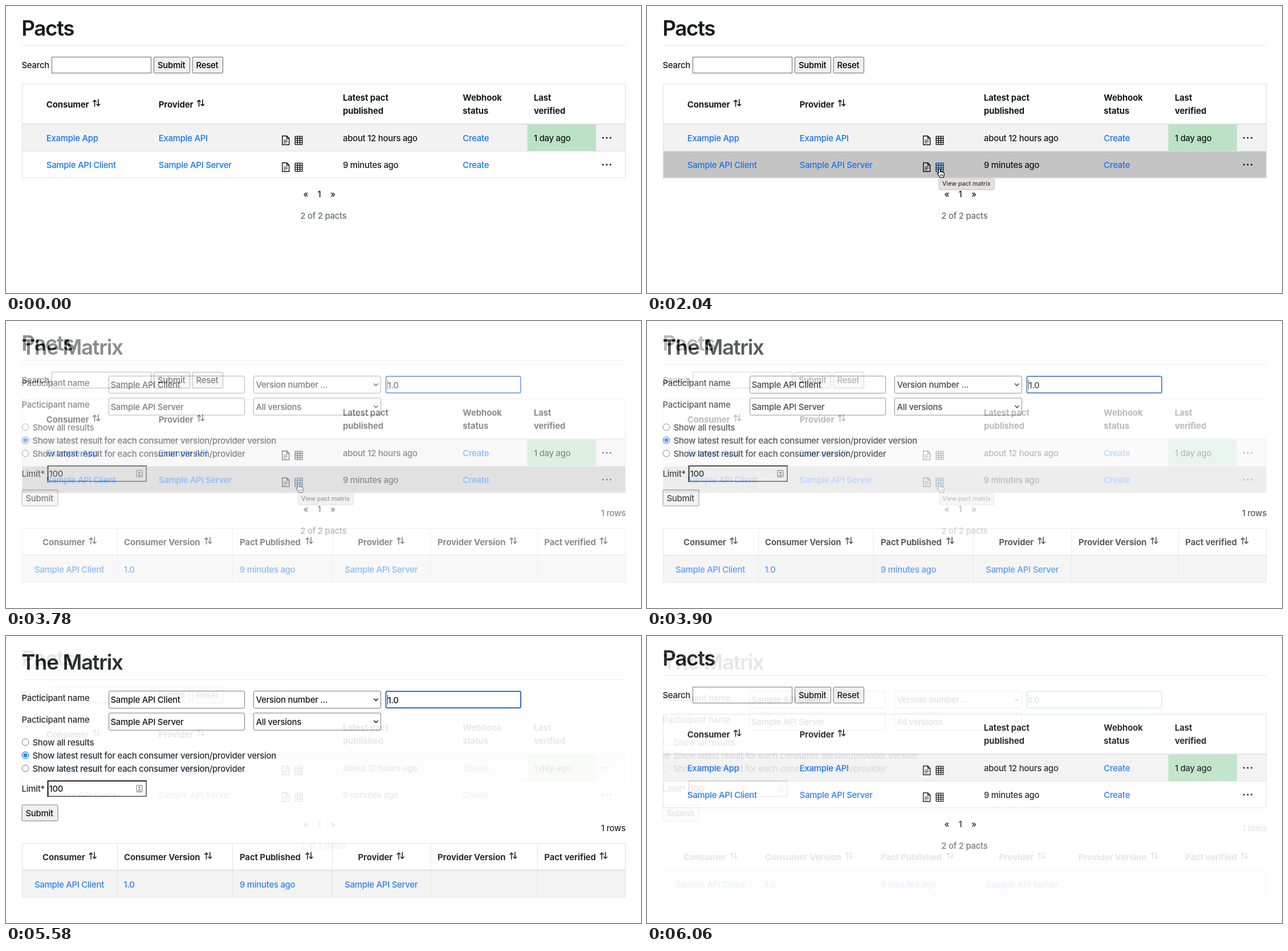
Write an HTML page that moves like this. It is 1114 by 503 pixels and loops after 6.12 s.

```html
<!DOCTYPE html>
<html lang="en">
<head>
<meta charset="utf-8">
<title>Pacts</title>
<style>
html, body { margin: 0; height: 100%; overflow: hidden; background: #fff; }
svg { display: block; width: 100vw; height: 100vh; }
text {
  font: 450 14.9px Inter, "Open Sans", sans-serif;
  font-optical-sizing: none;
  letter-spacing: -.25px;
  fill: #17191c;
  white-space: pre;
}
.bold { font-weight: 700; letter-spacing: -.1px; }
.title { font-size: 36.7px; font-weight: 600; letter-spacing: -1.35px; }
.link { fill: #1a73f5; }
.muted { fill: #6c7075; }
.form { fill: #000; }
.tip { font-size: 10.6px; letter-spacing: 0; fill: #333; }
.end { text-anchor: end; }
.mid { text-anchor: middle; }
</style>
</head>
<body>
<svg id="stage" viewBox="0 0 1114 503"></svg>
<script>
const LINE = '#dee0e3', EDGE = '#6b6b6b', INK = '#111', BLUE = '#1a73f5';

// y is the middle of the capitals
const text = (x, y, str, cls = '') => `<text x="${x}" y="${y + 5.5}" class="${cls}">${str}</text>`;
const title = (y, str) => `<text x="27.2" y="${y}" class="title">${str}</text>`;
const rect = (x, y, w, h, fill, extra = '') =>
  `<rect x="${x}" y="${y}" width="${w}" height="${h}" fill="${fill}" ${extra}/>`;
const path = (d, stroke = INK, width = 1.4, fill = 'none') =>
  `<path d="${d}" stroke="${stroke}" stroke-width="${width}" fill="${fill}" stroke-linecap="round" stroke-linejoin="round"/>`;
const frame = (x, y, w, h, fill = '#fff', stroke = EDGE, r = 0, lw = 1) =>
  rect(x + lw / 2, y + lw / 2, w - lw, h - lw, fill, `stroke="${stroke}" stroke-width="${lw}" rx="${r}"`);
const at = (x, y, body) => `<g transform="translate(${x} ${y})">${body}</g>`;

const sort = (x, y) => at(x, y, path('M3.5 12V1M.7 3.8L3.5 1l2.8 2.8M9.8 0v11M7 8.2l2.8 2.8 2.8-2.8', INK, 1.6));
const heading = (x, y, str, iconX) => text(x, y, str, 'bold') + sort(iconX, y - 8);
const button = (x, y, w, str) => frame(x, y, w, 29, '#efefef', EDGE, 1.5) + text(x + 7, y + 14.5, str, 'form');
const doc = (x, y) => at(x, y,
  path('M.7.7h8l4 4v11.6H.7zM8.5.9V5h4') + path('M3.4 8h6.4M3.4 10.5h6.4M3.4 13h4', INK, 1.1));
const grid = (x, y, color) => at(x, y,
  path('M.7.7h12.6v14.4H.7zM4.9.7v14.4M9.1.7v14.4M.7 4.3h12.6M.7 7.9h12.6M.7 11.5h12.6', color, 1.3));
const dots = y => [1047.3, 1053.9, 1060.5].map(x => `<circle cx="${x}" cy="${y}" r="1.5" fill="${INK}"/>`).join('');
const select = (y, str) => frame(434, y, 224, 31, '#fff', EDGE, 2) + text(438.5, y + 15.5, str, 'form') +
  path(`M645.8 ${y + 14}l3.2 3.4 3.2-3.4`, INK, 1.7);
const field = (y, str) => frame(180, y, 239, 31, '#fff', EDGE, 2) + text(183.5, y + 15.5, str, 'form');
const radio = (y, str, on) =>
  `<circle cx="34" cy="${y}" r="5.8" fill="#fff" stroke="${on ? BLUE : EDGE}" stroke-width="${on ? 1.3 : 1}"/>` +
  (on ? `<circle cx="34" cy="${y}" r="3.6" fill="${BLUE}"/>` : '') + text(46.5, y, str);

const row = (y, consumer, provider, published) =>
  text(70.8, y, consumer, 'link') + text(267.8, y, provider, 'link') +
  doc(484, y - 4.5) + grid(506.5, y - 3.8, INK) +
  text(591, y, published) + text(801.3, y, 'Create', 'link') + dots(y - .5);

const pacts =
  title(51.5, 'Pacts') + rect(28, 69, 1059, 1, '#e6e6e6') +
  text(27.5, 103.5, 'Search') + frame(80, 89, 175, 29) +
  button(259, 89, 64, 'Submit') + button(326.5, 89, 54.5, 'Reset') +
  rect(28, 208, 1059, 46, '#f2f2f2') + rect(914.5, 208, 120.5, 46, '#bbe2c5') +
  `<g class="hover">${rect(28, 254.5, 1059, 47, '#c4c4c4')}</g>` +
  frame(28, 136.5, 1059, 165, 'none', LINE) +
  rect(28, 206, 1059, 2, LINE) + rect(28, 254, 1059, 1, LINE) +
  heading(70.8, 172, 'Consumer', 152) + heading(267.8, 172, 'Provider', 335) +
  text(591, 160.5, 'Latest pact', 'bold') + text(591, 183.5, 'published', 'bold') +
  text(801.3, 160.5, 'Webhook', 'bold') + text(801.3, 183.5, 'status', 'bold') +
  text(926, 160.5, 'Last', 'bold') + text(926, 183.5, 'verified', 'bold') +
  row(231.5, 'Example App', 'Example API', 'about 12 hours ago') +
  text(926, 231.5, '1 day ago') +
  row(278.5, 'Sample API Client', 'Sample API Server', '9 minutes ago') +
  text(526, 329, '«', 'mid') + text(549.5, 329, '1', 'mid') + text(573.5, 329, '»', 'mid') +
  text(516.3, 367, '2 of 2 pacts', 'muted');

const hand = at(508.5, 284.5,
  path('M3.2 2c0-2 2.8-2 2.8 0v4.5c.6-1.2 2.4-1 2.6.3.7-.9 2.2-.5 2.3.7.9-.6 2 0 2 1.2v2.6c0 1.8-1.1 2.3-1.2 4.7H5.3C5 14 2.6 12 1 9.8c-.9-1.4.7-2.4 2.2-.8z', '#000', 1.1, '#fff') +
  path('M6.3 10.5v3M8.4 10.5v3M10.4 10.5v3', '#000', .8));
const hover =
  grid(506.5, 274.7, '#1c5a9c') +
  rect(511.5, 302, 99, 21.5, '#000', 'rx="4" opacity=".1"') +
  frame(511.5, 301, 98, 21, '#e5e0e0', '#cfcaca', 3.5) +
  `<text x="518" y="315.2" class="tip">View pact matrix</text>` + hand;

const matrix =
  rect(0, 0, 1114, 503, '#fff') +
  title(59, 'The Matrix') + rect(28, 76, 1059, 1, '#e6e6e6') +
  text(27.5, 108.5, 'Pacticipant name') + field(96, 'Sample API Client') + select(96, 'Version number ...') +
  frame(665.5, 96, 238.5, 31, '#fff', '#1f5bc4', 2.5, 2) + rect(669, 103, 1, 17, INK) + text(669.5, 112, '1.0', 'form') +
  text(27.5, 146.5, 'Pacticipant name') + field(134.5, 'Sample API Server') + select(134.5, 'All versions') +
  radio(186, 'Show all results') +
  radio(209, 'Show latest result for each consumer version/provider version', true) +
  radio(232, 'Show latest result for each consumer version/provider') +
  text(27.5, 267.5, 'Limit*') + frame(72.5, 253, 174.5, 29, '#fff', EDGE, 0, 2) +
  path('M73.5 281V254H246', '#111', 2) + text(75.5, 267.5, '100', 'form') +
  frame(228.5, 261, 11, 13, '#fff', '#777', 1.5, 1.2) +
  `<circle cx="234" cy="265.5" r="1.6" fill="#666"/>` + path('M231.6 269.3h4.8M231.6 271.3h4.8', '#666', 1) +
  button(27.5, 295.5, 64, 'Submit') + text(1087, 336.5, '1 rows', 'end') +
  rect(28, 411, 1059, 47, '#f2f2f2') + frame(28, 363, 1059, 95.5, 'none', LINE) +
  rect(28, 409.5, 1059, 2, LINE) +
  [195, 397, 572, 744.5, 932].map(x => rect(x, 363, 1, 95, LINE)).join('') +
  [['Consumer', 64, 145.5], ['Consumer Version', 207, 348], ['Pact Published', 410, 525.3],
   ['Provider', 617.5, 685.5], ['Provider Version', 757, 883.3], ['Pact verified', 944.3, 1041.7]]
    .map(([str, x, icon]) => heading(x, 387, str, icon)).join('') +
  text(50, 435, 'Sample API Client', 'link') + text(206.5, 435, '1.0', 'link') +
  text(410, 435, '9 minutes ago', 'link') + text(594.3, 435, 'Sample API Server', 'link');

const stage = document.getElementById('stage');
stage.innerHTML = `<g>${pacts}</g><g class="hover">${hover}</g><g id="matrix">${matrix}</g>`;
const hovers = stage.querySelectorAll('.hover');
const matrixPage = document.getElementById('matrix');

// Crossfades advance by a tenth every 60 ms
const fade = (t, start) => Math.min(1, Math.max(0, (Math.floor((t - start) / 60) + 1) / 10));

function draw(now) {
  const t = now % 6120;
  const back = fade(t, 5580);
  hovers.forEach(g => g.setAttribute('opacity', back ? 0 : fade(t, 1500)));
  matrixPage.setAttribute('opacity', fade(t, 3540) - back);
}

const begin = performance.now();
function tick() {
  draw(performance.now() - begin);
  requestAnimationFrame(tick);
}
tick();
</script>
</body>
</html>
```
